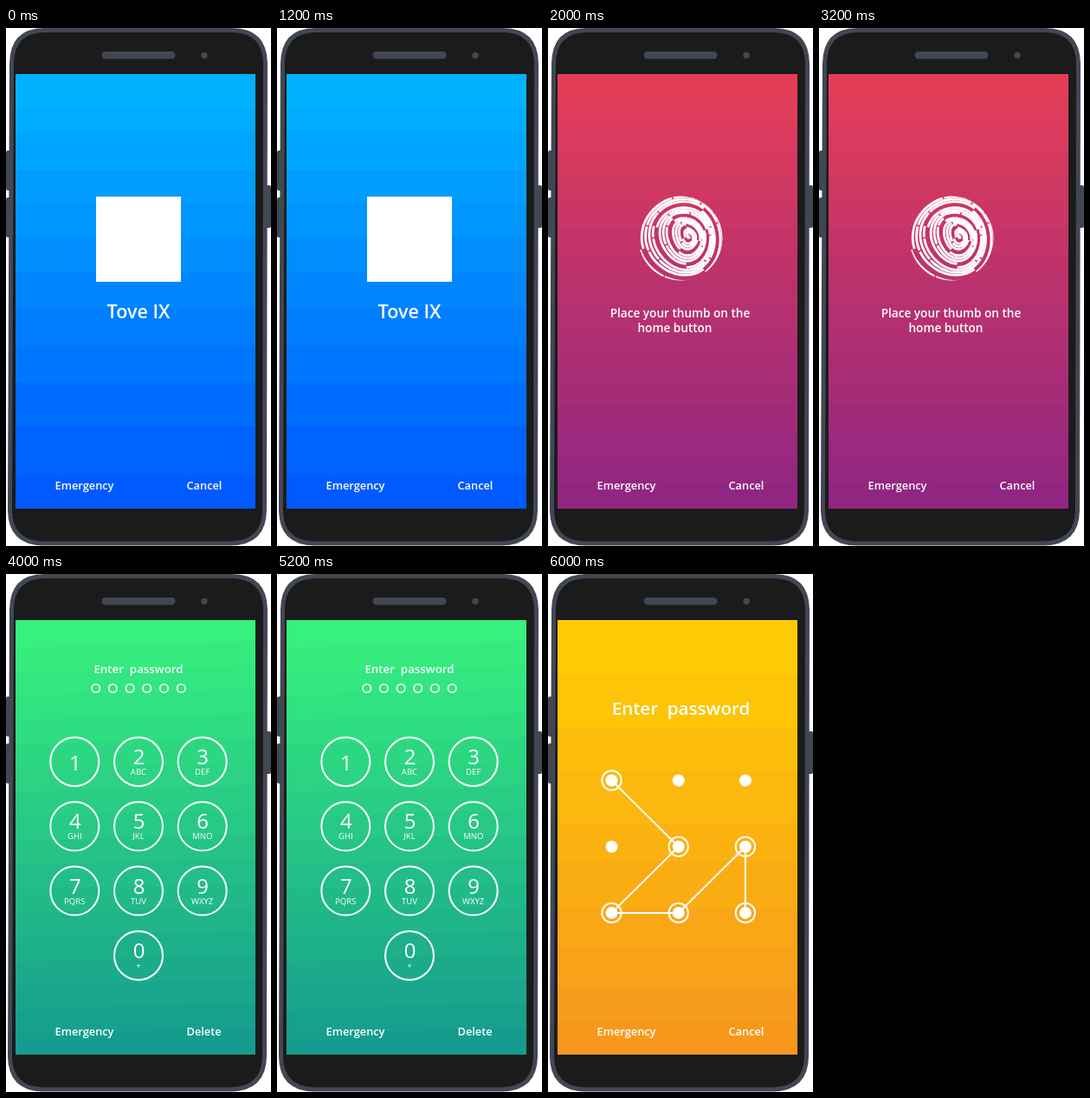
An HTML page for the animation above (8 s loop, 306 by 596 pixels).

```html
<!DOCTYPE html>
<html lang="en">
<head>
<meta charset="utf-8">
<title>Phone unlock screens</title>
<style>
html, body { margin: 0; width: 100%; height: 100%; overflow: hidden; background: #fff; }
svg { display: block; width: 306px; height: 596px; }
text { font: 600 12.8px "Open Sans", "Noto Sans", sans-serif; fill: #fff; white-space: pre; }
.mid { text-anchor: middle; }
.scene { visibility: hidden; animation: show 8s step-end infinite; }
#face { animation-delay: -8s; }
#thumb { animation-delay: -6s; }
#keypad { animation-delay: -4s; }
#pattern { animation-delay: -2s; }
@keyframes show {
  0% { visibility: visible; }
  25%, 100% { visibility: hidden; }
}
.line { fill: none; stroke: #fff; stroke-width: 2; }
.digit { font-weight: 400; font-size: 24px; }
.letters { font-weight: 400; font-size: 9.6px; }
</style>
</head>
<body>
<svg viewBox="0 0 306 596">
  <defs>
    <clipPath id="screen"><rect x="11" y="53" width="277" height="500"/></clipPath>
    <clipPath id="tip"><circle cx="153" cy="242" r="48.5"/></clipPath>
  </defs>

  <g fill="#414753">
    <rect x="0" y="141" width="8" height="46" rx="2"/>
    <rect x="0" y="195" width="8" height="46" rx="2"/>
    <rect x="298" y="181" width="8" height="49" rx="2"/>
  </g>
  <path d="M44 2.5H261Q299 3 299.5 41L298.500 555Q298 592 260 593H42Q5 592 4.500 555L6.500 41Q7 3 44 2.500Z"
        fill="#1b1b1b" stroke="#414753" stroke-width="5"/>
  <rect x="110.500" y="27" width="85" height="8.500" rx="4.200" fill="#414753"/>
  <circle cx="229" cy="31.500" r="3.700" fill="#414753"/>

  <g clip-path="url(#screen)">
    <g id="face" class="scene">
      <g class="bands"></g>
      <rect x="104" y="194" width="98" height="98" fill="#fff"/>
      <text class="mid" x="153" y="333.500" style="font-size:21.5px">Tove IX</text>
      <text x="208.500" y="531">Cancel</text>
    </g>

    <g id="thumb" class="scene">
      <g class="bands"></g>
      <g id="ridges" clip-path="url(#tip)" fill="none" stroke="#fff" stroke-width="2.800"></g>
      <text class="mid" x="152.500" y="333" style="font-size:13.6px">Place your thumb on the</text>
      <text class="mid" x="146.500" y="350" style="font-size:13.6px">home button</text>
      <text x="208.500" y="531">Cancel</text>
    </g>

    <g id="keypad" class="scene">
      <g class="bands"></g>
      <text class="mid" x="153" y="114" style="font-size:13.3px">Enter&#160;&#160;password</text>
      <g id="keys"></g>
      <text x="208.500" y="531">Delete</text>
    </g>

    <g id="pattern" class="scene">
      <g class="bands"></g>
      <text class="mid" x="153.500" y="162" style="font-size:20.6px">Enter&#160;&#160;password</text>
      <g id="dots"></g>
      <text x="208.500" y="531">Cancel</text>
    </g>

    <text x="56.500" y="531">Emergency</text>
  </g>
</svg>

<script>
const NS = "http://www.w3.org/2000/svg";
const $ = id => document.getElementById(id);

function add(parent, tag, attrs, text) {
  const el = document.createElementNS(NS, tag);
  for (const key in attrs) el.setAttribute(key, attrs[key]);
  if (text) el.textContent = text;
  parent.appendChild(el);
  return el;
}

// Flat colour steps down the screen; each step covers all below it.
function bands(id, from, to, edges, tilt = 0) {
  const box = $(id).querySelector(".bands");
  const ys = [53, ...edges, 553];
  for (let i = 0; i < ys.length - 1; i++) {
    const k = ((ys[i] + ys[i + 1]) / 2 - 53) / 500;
    const rgb = from.map((c, j) => Math.round(c + (to[j] - c) * k));
    const y = ys[i], lift = i ? tilt : 0;
    add(box, "path", {
      d: `M11 ${y + lift}L288 ${y - lift}V553H11Z`,
      fill: `rgb(${rgb})`
    });
  }
}

const even = (n, y = 53, h = 500) =>
  Array.from({ length: n - 1 }, (_, i) => Math.round(y + h * (i + 1) / n));

bands("face", [0, 182, 255], [0, 86, 255],
  [91, 121, 163, 200, 240, 282, 322, 365, 408, 458, 515]);
bands("thumb", [230, 62, 87], [142, 37, 131], even(17));
bands("keypad", [56, 243, 124], [20, 153, 143], even(18), 4);
bands("pattern", [255, 207, 3], [247, 150, 30],
  [117, 178, 228, 287, 330, 384, 428, 475, 515]);

// Fingerprint: tilted oval rings around an off-centre core, with small breaks.
let seed = 7;
const rand = () => (seed = seed * 16807 % 2147483647) / 2147483647;

function ridge(i) {
  const r = 1.6 + i * 4.1;
  const start = 1.2 + i * 1.9;
  const drift = Math.min(1, i / 12);
  const cx = 163 - 9 * drift, cy = 239 + 3 * drift;
  const wide = 0.72 + 0.28 * drift, lean = -0.38;
  let d = "";
  for (let s = 0; s <= 90; s++) {
    const a = start + s / 90 * Math.PI * 2;
    const q = r + s / 90 * 4.1 + 0.7 * Math.sin(3 * a + i * 0.35);
    const u = Math.cos(a) * q * wide, v = Math.sin(a) * q;
    const x = cx + u * Math.cos(lean) - v * Math.sin(lean);
    const y = cy + u * Math.sin(lean) + v * Math.cos(lean);
    d += (s ? "L" : "M") + x.toFixed(1) + " " + y.toFixed(1);
  }
  const dash = i < 2 ? "none" : `${40 + rand() * 50} 1.6 ${25 + rand() * 60} 1.6`;
  add($("ridges"), "path", { d, "stroke-dasharray": dash });
}
for (let i = 0; i < 14; i++) ridge(i);

// Keypad
for (let i = 0; i < 6; i++)
  add($("keys"), "circle", {
    cx: 103.7 + i * 19.7, cy: 131.5, r: 4.7, class: "line", style: "stroke-width:1.6"
  });

const labels = ["", "ABC", "DEF", "GHI", "JKL", "MNO", "PQRS", "TUV", "WXYZ", "+"];
labels.forEach((label, i) => {
  const col = i === 9 ? 1 : i % 3;
  const x = 79.3 + col * 73.7;
  const y = 216 + Math.floor(i / 3) * 74.3;
  add($("keys"), "circle", { cx: x, cy: y, r: 28, class: "line" });
  add($("keys"), "text", { x: x + 0.5, y: y + (label ? 3 : 9.5), class: "digit mid" }, String((i + 1) % 10));
  if (label) add($("keys"), "text", { x, y: y + 15, class: "letters mid" }, label);
});

// Unlock pattern
const spot = n => [73.5 + (n % 3) * 77.2, 237.5 + Math.floor(n / 3) * 76.2];
const trail = [0, 4, 6, 7, 5, 8];
add($("dots"), "polyline", { points: trail.map(spot).join(" "), class: "line" });
for (let n = 0; n < 9; n++) {
  const [cx, cy] = spot(n);
  add($("dots"), "circle", { cx, cy, r: 7, fill: "#fff" });
  if (trail.includes(n)) add($("dots"), "circle", { cx, cy, r: 11.2, class: "line" });
}
</script>
</body>
</html>
```
